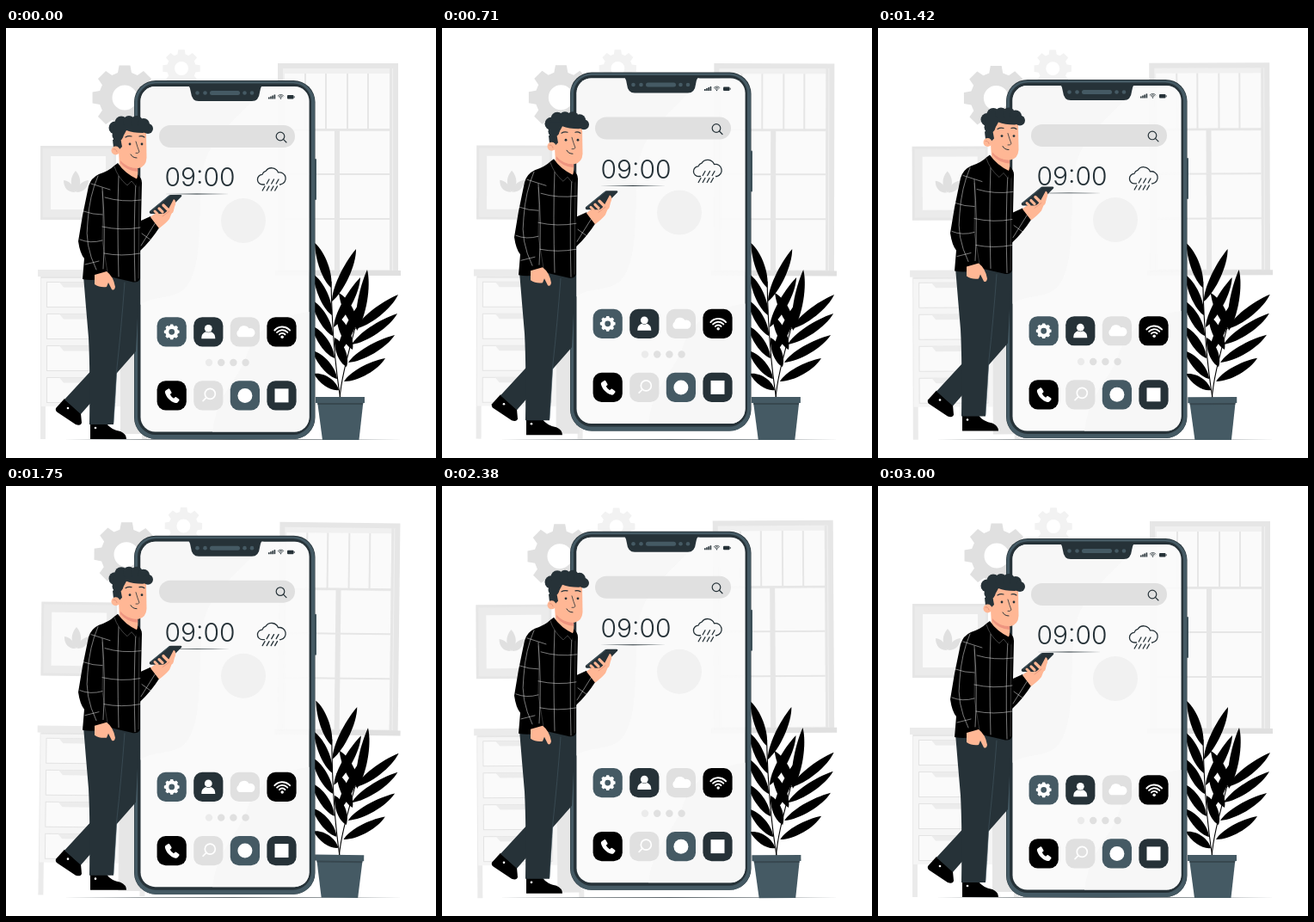
An HTML page with a canvas for the animation above (3.04 s loop, 500 px wide and 500 px high).

```html
<!DOCTYPE html>
<html lang="en">
<head>
<meta charset="utf-8">
<title>Phone home screen</title>
<style>
html, body { margin: 0; width: 100%; height: 100%; overflow: hidden; background: #fff; }
canvas { display: block; width: 100vw; height: 100vh; }
</style>
</head>
<body>
<canvas id="stage"></canvas>
<script>
const LOOP = 3040, BEAT = 1500;
const DARK = '#263238', SLATE = '#455a64', GREY = '#e0e0e0', SKIN = '#ffb795';
const canvas = document.getElementById('stage');
const ctx = canvas.getContext('2d');

// ---- helpers ----
function fill(d, color) {
  ctx.fillStyle = color;
  ctx.fill(new Path2D(d), 'evenodd');
}
function line(d, color, width = 1) {
  ctx.strokeStyle = color;
  ctx.lineWidth = width;
  ctx.stroke(new Path2D(d));
}
function rect(x, y, w, h, color, r = 0) {
  ctx.beginPath();
  ctx.roundRect(x, y, w, h, r);
  ctx.fillStyle = color;
  ctx.fill();
}
function disc(x, y, r, color) {
  ctx.beginPath();
  ctx.arc(x, y, r, 0, Math.PI * 2);
  ctx.fillStyle = color;
  ctx.fill();
}
function ring(x, y, r, color, width) {
  ctx.beginPath();
  ctx.arc(x, y, r, 0, Math.PI * 2);
  ctx.strokeStyle = color;
  ctx.lineWidth = width;
  ctx.stroke();
}
// Horizontal rule that thins out towards both ends
function taper(x1, x2, y, bulge) {
  const mid = (x1 + x2) / 2;
  fill(`M${x1} ${y}Q${mid} ${y - bulge} ${x2} ${y}Q${mid} ${y + bulge} ${x1} ${y}Z`, DARK);
}
function layer(draw, dy = 0, angle = 0, cx = 0, cy = 0) {
  ctx.save();
  ctx.translate(cx, cy + dy);
  ctx.rotate(angle * Math.PI / 180);
  ctx.translate(-cx, -cy);
  draw();
  ctx.restore();
}
function gear(x, y, outer, body, hole, color) {
  ctx.beginPath();
  for (let i = 0; i < 8; i++) {
    const a = i * Math.PI / 4;
    const at = (r, da) => ctx.lineTo(x + r * Math.cos(a + da), y + r * Math.sin(a + da));
    at(body, -0.27);
    at(outer, -0.17);
    at(outer, 0.17);
    at(body, 0.27);
  }
  ctx.closePath();
  ctx.moveTo(x + hole, y);
  ctx.arc(x, y, hole, 0, Math.PI * 2);
  ctx.fillStyle = color;
  ctx.fill('evenodd');
}
function wifi(x, y, s, color) {
  ctx.strokeStyle = color;
  ctx.lineWidth = s * 0.22;
  for (const r of [0.5, 0.92, 1.34]) {
    ctx.beginPath();
    ctx.arc(x, y, r * s, -Math.PI * 0.77, -Math.PI * 0.23);
    ctx.stroke();
  }
  disc(x, y, s * 0.2, color);
}

// ---- motion: both are linear between key points ----
const rise = p => -10 * (1 - Math.abs(1 - 2 * p));
const sway = p => p < 0.25 ? 4 * p : p < 0.75 ? 2 - 4 * p : 4 * p - 4;

// ---- background ----
function windowFrame() {
  rect(316, 41, 140, 243, '#e6e6e6');
  rect(322, 47, 128, 235, '#f0f0f0');
  rect(324, 53, 122, 65, '#fafafa');
  for (const x of [347, 371, 396, 420]) rect(x, 53, 2, 65, '#e6e6e6');
  rect(322, 117, 126, 2.5, '#e6e6e6');
  rect(324, 120, 122, 161, '#fafafa');
  rect(382, 119, 6, 163, '#e6e6e6');
  rect(324, 169, 122, 2, '#e6e6e6');
  rect(324, 221, 122, 2, '#e6e6e6');
  rect(446, 47, 3, 235, '#e6e6e6');
  rect(313, 282, 146, 6, '#e0e0e0');
}
function wallPicture() {
  rect(40, 137, 88, 86, '#e6e6e6');
  rect(43, 140, 82, 80, '#ebebeb');
  rect(52, 149, 64, 62, '#fafafa');
  fill('M81 166C74 174 74 184 81 191C88 184 88 174 81 166Z', GREY);
  fill('M67 177C67 186 72 191 80 191C79 183 74 178 67 177Z', GREY);
  fill('M96 177C95 186 90 191 82 191C83 183 88 178 96 177Z', GREY);
}
function cabinet() {
  rect(40, 289, 6, 189, '#ebebeb');
  rect(158, 289, 6, 189, '#ebebeb');
  rect(41, 288, 92, 152, '#f5f5f5');
  rect(133, 288, 27, 184, '#e6e6e6');
  rect(37, 281, 130, 8, '#ebebeb');
  rect(41, 289, 122, 2, '#e6e6e6');
  for (let i = 0; i < 4; i++) {
    const y = 295.5 + i * 37;
    rect(47.5, y, 80, 29, '#fafafa');
    ctx.strokeStyle = '#e3e3e3';
    ctx.lineWidth = 1;
    ctx.strokeRect(47.5, y, 80, 29);
    fill(`M62 ${y}H112L107 ${y + 6}H67Z`, '#ececec');
  }
}
function background() {
  gear(204, 47, 22, 17, 8, '#f2f2f2');
  gear(138, 81, 38, 30, 14.5, GREY);
  windowFrame();
  wallPicture();
  cabinet();
}

// ---- plant ----
// base x, base y, tip x, tip y
const leaves = [
  [378, 302, 359, 250], [379, 334, 357, 286], [380, 358, 355, 316],
  [382, 384, 355, 346], [385, 408, 356, 375], [387, 421, 358, 402],
  [379, 318, 407, 257], [381, 348, 412, 290], [385, 380, 413, 318],
  [408, 352, 420, 281], [409, 350, 387, 308], [403, 374, 384, 334],
  [396, 394, 382, 360],
  [406, 350, 456, 310], [402, 368, 455, 332],
  [398, 389, 452, 357], [393, 411, 441, 384]
];
function leaf([x, y, tx, ty]) {
  const dx = tx - x, dy = ty - y, len = Math.hypot(dx, dy);
  const nx = -dy / len * 8, ny = dx / len * 8;
  ctx.beginPath();
  ctx.moveTo(x, y);
  ctx.bezierCurveTo(x + dx * 0.25 + nx, y + dy * 0.25 + ny, x + dx * 0.75 + nx, y + dy * 0.75 + ny, tx, ty);
  ctx.bezierCurveTo(x + dx * 0.65 - nx * 0.8, y + dy * 0.65 - ny * 0.8, x + dx * 0.2 - nx * 0.8, y + dy * 0.2 - ny * 0.8, x, y);
  ctx.fillStyle = '#000';
  ctx.fill();
}
function plant() {
  line('M389 432C383 395 379 350 378 295', '#000', 1.1);
  line('M388 432C390 400 404 360 413 320', '#000', 1.1);
  leaves.forEach(leaf);
  fill('M362 434H415.5L410.5 479H368Z', SLATE);
  fill('M362 434H415.5L415 438H362.5Z', '#37474f');
  rect(360, 429, 57, 7, SLATE);
}

// ---- phone ----
function cloud(x, y, s, color) {
  ctx.save();
  ctx.translate(x, y);
  ctx.scale(s, s);
  fill('M-7 6A4.6 4.6 0 0 1 -7.5 -2A6.6 6.6 0 0 1 4.5 -4A5.2 5.2 0 0 1 8 6Z', color);
  ctx.restore();
}
// side: 1 puts the handle on the right, -1 on the left
function magnifier(x, y, r, side, color, width) {
  const near = r * 0.72, far = r + 2.2;
  ring(x, y, r, color, width);
  line(`M${x + side * near} ${y + near}L${x + side * far} ${y + far}`, color, width);
}
function person(x, y) {
  disc(x, y - 4, 4.4, '#fff');
  fill(`M${x - 8} ${y + 8}c0 -6 3 -7 5 -8q3 2 6 0c2 1 5 2 5 8z`, '#fff');
}
function handset(x, y) {
  fill(`M${x - 7} ${y - 6}l3 -2q1 -.5 1.7 .6l2 3.4q.5 1 -.4 1.7l-1.3 1q1.4 3 4.4 4.6l1.2 -1.3q.8 -.8 1.7 -.2l3 2.2q1 .8 .3 1.8l-1.8 2.2q-1 1 -2.6 .6c-6 -1.7 -10.6 -6.5 -12 -12.2q-.3 -1.5 .8 -2.4z`, '#fff');
}
const apps = [
  [SLATE, (x, y) => gear(x, y, 9, 7.4, 3.4, '#fff')],
  [DARK, person],
  [GREY, (x, y) => cloud(x, y, 1, '#fff')],
  ['#000', (x, y) => wifi(x + 0.7, y + 6, 8.8, '#fff')],
  ['#000', handset],
  [GREY, (x, y) => magnifier(x + 2, y - 2, 6, -1, '#fff', 1.7)],
  [SLATE, (x, y) => disc(x, y, 8.5, '#fff')],
  [DARK, (x, y) => rect(x - 8, y - 8, 16, 16, '#fff')]
];
function weather() {
  line('M300.5 182H298.5A5.8 5.8 0 0 1 298 170.4A6 6 0 0 1 302 166.5A8.2 8.2 0 0 1 316.5 168A6.8 6.8 0 0 1 319.5 182H318.5', DARK, 1.3);
  for (const x of [306, 311.5, 317]) line(`M${x} 176l-2.8 5`, DARK, 1.3);
  for (const x of [301, 306, 311, 315.5]) line(`M${x} 184l-2.8 5`, DARK, 1.3);
}
function statusBar() {
  for (let i = 0; i < 4; i++) rect(305 + i * 2.2, 80.5 - i, 1.6, 2 + i, DARK);
  wifi(319.5, 82, 3.4, DARK);
  rect(327, 78, 7.5, 4.6, DARK, 1);
  rect(334.7, 79.3, 0.9, 2, DARK);
}
function phone(tilt, dy) {
  rect(359, 152, 2, 48, SLATE, 1);
  rect(149, 61, 210.5, 417, DARK, 25);
  rect(149.5, 62, 209.5, 416, SLATE, 24.5);
  rect(153, 64.5, 202, 408.5, DARK, 21);
  ctx.save();
  ctx.beginPath();
  ctx.roundRect(156.5, 68, 196, 401.5, 17);
  ctx.fillStyle = '#fafafa';
  ctx.fill();
  ctx.clip();
  fill('M156 67H300C275 105 238 120 229 165C222 205 232 280 207 304C190 317 172 310 156 322Z', '#f7f7f7');
  fill('M353 330C315 335 290 350 280 380C270 410 245 425 240 470H353Z', '#f7f7f7');
  ctx.globalAlpha = 0.1;
  ctx.translate(0, -dy);
  layer(windowFrame, 0, tilt, 249, 253);
  ctx.restore();
  disc(276, 224, 26, '#f1f1f1');

  fill('M212 66H298Q295.5 70 295 75Q294 85 286 85H224Q216 85 215 75Q214.5 70 212 66Z', DARK);
  rect(237, 73, 35, 5, SLATE, 2.5);
  for (const x of [222.5, 231.5, 277.5, 286]) disc(x, 75.5, 2.3, SLATE);
  statusBar();

  rect(178, 113, 158, 26, GREY, 13);
  magnifier(319, 126, 4.8, 1, DARK, 1.2);

  ctx.fillStyle = DARK;
  ctx.font = '300 30px Inter, Lato, sans-serif';
  ctx.textAlign = 'center';
  ctx.fillText('09:00', 225.5, 184);
  taper(184, 260, 193, 0.8);
  weather();

  apps.forEach(([color, glyph], i) => {
    const x = 192.7 + i % 4 * 42.6, y = i < 4 ? 353.3 : 427.4;
    rect(x - 17.1, y - 17.1, 34.2, 34.2, color, 10);
    glyph(x, y);
  });
  for (let i = 0; i < 4; i++) disc(236 + i * 14.2, 389, 4.2, i ? GREY : '#ebebeb');
}

// ---- man ----
function legs() {
  fill('M68 431L58 442Q57 445 60 447L81 461Q87 463 88 459L87 448Z', '#000');
  disc(72, 442, 1.3, '#fff');
  fill('M126 290L155 292Q153 340 151 376L87 449L68 432L104 393Z', DARK);
  fill('M98 460H117Q122 467 133 469Q140 472 140 478H98Z', '#000');
  disc(104, 465, 1.3, '#fff');
  fill('M90 288H139Q134 350 129 395Q127 430 125 461H97Q98 400 96 360Q93 325 90 288Z', DARK);
  line('M138 296Q134 350 129 395L125 459', SLATE, 0.6);
}
function body() {
  fill('M126 160Q120 166 108 170Q99 174 96 184L89 218L84 248Q86 262 91 268L89 292Q104 295 120 289L146 295Q154 297 156 291L156 259Q168 248 179 231L168 219L157 224L158 180Q158 174 152 170L140 165Z', '#000');
  const plaid = [
    'M131 172Q129 220 131 289', 'M112 186Q116 235 113 280', 'M151 178Q148 230 150 294',
    'M115 197Q135 203 157 200', 'M112 231Q134 236 156 232', 'M114 262Q134 266 156 262',
    'M99 181L121 188', 'M90 213Q101 217 112 217', 'M86 246Q98 251 112 247',
    'M107 172Q97 195 95 225Q91 252 105 281', 'M158 239L169 247', 'M157 253L174 226', 'M92 275L108 271'
  ];
  for (const d of plaid) line(d, 'rgba(255,255,255,.8)', 0.6);
  line('M155 181L154 291', 'rgba(255,255,255,.4)', 0.5);
  line('M112 190Q113 220 112 247L118 284', 'rgba(255,255,255,.4)', 0.5);
  fill('M103 287L117 283Q125 289 127 301Q126 306 123 304L119 296L117 301Q109 302 103 298Z', SKIN);
}
function hand() {
  fill('M168 220Q172 216 180 212L191 205Q196 207 195 212Q192 216 190 222Q186 227 178 233Z', SKIN);
  fill('M167 213L189 195Q190 194 192 194H203Q205 194 204 196L186 214Q184 216 182 216H168Q166 215 167 213Z', DARK);
  line('M168.5 213L190 195', SLATE, 1);
  line('M173 213L176 216', SKIN, 3);
  line('M178 210L182 214', SKIN, 3.2);
  line('M183 206L188 211', SKIN, 3.4);
  fill('M187 214L195 199Q199 201 196 208L194 215Z', SKIN);
  line('M182 219L190 213', '#d98771', 0.6);
}
function head() {
  fill('M131 142L132 163Q142 173 152 176Q154 170 153 160Z', SKIN);
  fill('M133 152Q139 163 153 163L153 167Q140 166 133 157Z', '#ee9580');
  fill('M131 124Q145 113 163 121L163.5 151Q163 161 154 163Q140 163 132 153Z', SKIN);
  fill('M124 130L133 127L135 138L131 142L125 139Z', DARK);
  disc(127.5, 142.5, 5, SKIN);
  line('M125 141Q128 140 129 144', '#d98771', 0.7);
  for (const [x, y, r] of [[127, 116, 7.5], [134, 110, 7.5], [143, 109, 7], [152, 109, 7], [160, 112, 7], [165, 117, 6], [130, 125, 6.5]])
    disc(x, y, r, DARK);
  fill('M126 114H166Q166 121 159 122Q147 122 140 119Q136 127 132 131L125 130Z', DARK);
  line('M139 127Q142 125 146 126', DARK, 1.2);
  line('M155 126Q158 125 161 127', DARK, 1.2);
  disc(144, 135, 1.4, DARK);
  disc(158, 135, 1.4, DARK);
  line('M151 132Q153 139 155 144Q154 146 151 145.5', DARK, 0.8);
  line('M145 147Q147 151 152 151', DARK, 1);
  fill('M126 160L130 157Q138 169 153 176L151 184L146 178L141 183Q130 174 126 160Z', '#000');
  fill('M153 174L157 178L155 185L151 179Z', '#000');
  line('M126 161Q130 174 141 183L146 178L151 184', 'rgba(255,255,255,.5)', 0.5);
}
function man() {
  legs();
  body();
  head();
  hand();
}

function render(t) {
  const scale = window.devicePixelRatio || 1;
  const w = Math.round(innerWidth * scale), h = Math.round(innerHeight * scale);
  if (canvas.width !== w || canvas.height !== h) {
    canvas.width = w;
    canvas.height = h;
  }
  ctx.setTransform(w / 500, 0, 0, h / 500, 0, 0);
  ctx.fillStyle = '#fff';
  ctx.fillRect(0, 0, 500, 500);
  ctx.lineCap = ctx.lineJoin = 'round';

  const beat = t % BEAT / BEAT;
  const slow = t % (BEAT * 2) / (BEAT * 2);
  const tilt = sway(beat), dy = rise(beat);
  layer(background, 0, tilt, 249, 253);
  taper(66, 462, 478.4, 0.7);
  layer(plant, 0, tilt, 400, 365);
  layer(() => phone(tilt, dy), dy);
  layer(man, rise(slow));
}

function tick() {
  render(performance.now() % LOOP);
  requestAnimationFrame(tick);
}
tick();
</script>
</body>
</html>
```
